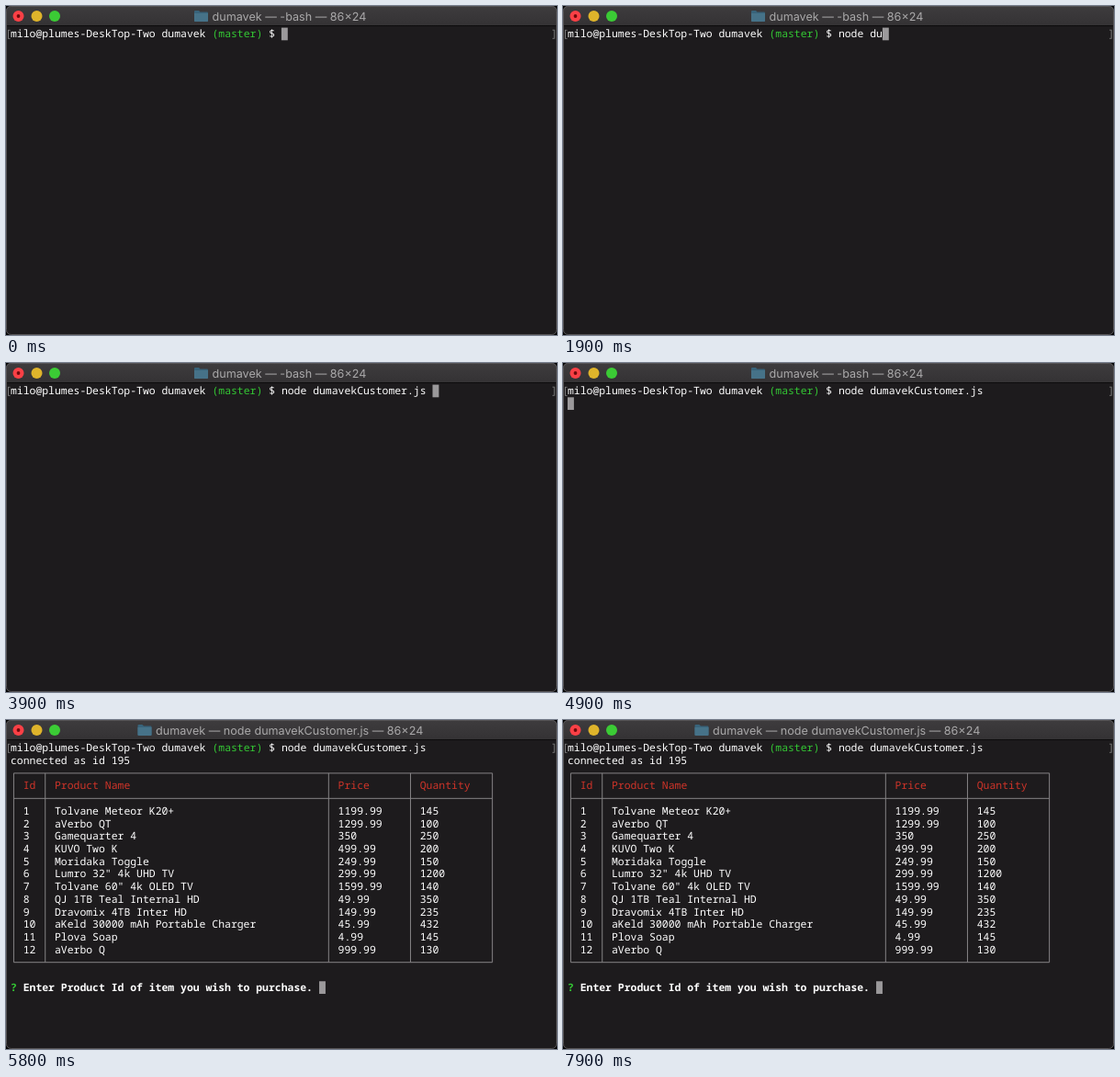
Recreate the animation shown at these times as an HTML page. Size 600 by 358 pixels, loop 8 s.

```html
<!DOCTYPE html>
<html lang="en">
<head>
<meta charset="utf-8">
<title>Terminal session</title>
<style>
  html, body { margin: 0; height: 100%; overflow: hidden; background: #000; }
  svg { display: block; width: 600px; height: 358px; }
  text { white-space: pre; text-rendering: geometricPrecision; }
  .mono { font: 500 11.43px "Noto Sans Mono", monospace; fill: #fff; }
  #title { font: 12.6px Inter, sans-serif; fill: #a9a8a9; }
  .mono .bold { font-weight: 700; }
  .mono .green { fill: #34c834; }
  .mono .red { fill: #cf3429; }
  .mono .dim { fill: #7c7b7c; font-weight: 400; }
</style>
</head>
<body>
<svg viewBox="0 0 600 358">
  <defs>
    <linearGradient id="bar" x2="0" y2="1">
      <stop stop-color="#3e3c3e"/><stop offset="1" stop-color="#343234"/>
    </linearGradient>
    <clipPath id="frame"><rect width="600" height="358" rx="5"/></clipPath>
  </defs>
  <g clip-path="url(#frame)">
    <rect width="600" height="358" fill="#1d1b1d"/>
    <rect width="600" height="21" fill="url(#bar)"/>
    <rect y="21" width="600" height="1" fill="#0c0b0c"/>
  </g>
  <rect x=".5" y=".5" width="599" height="357" rx="5" fill="none" stroke="#555355"/>
  <circle cx="13.5" cy="11" r="6" fill="#fb4046"/>
  <circle cx="13.5" cy="11" r="1.9" fill="#6e0a0c"/>
  <circle cx="33.5" cy="11" r="6" fill="#dfb42b"/>
  <circle cx="53" cy="11" r="6" fill="#3bcb35"/>
  <g id="heading">
    <path d="M0 6q0-1 1-1h4l1.5 1.5h7.5q1 0 1 1v8.500q0 1-1 1H1q-1 0-1-1z" fill="#38637a"/>
    <path d="M0 8h15v8q0 1-1 1H1q-1 0-1-1z" fill="#467288"/>
    <text id="title" x="19.500" y="15.700"></text>
  </g>
  <rect id="cursor" width="6.900" height="13.700" fill="#9b999b"/>
  <g class="mono">
    <g id="prompt"></g>
    <text id="typed"></text>
    <text id="status"></text>
    <g id="table"></g>
  </g>
</svg>
<script>
const $ = id => document.getElementById(id);
const LOOP = 8000, CELL = 6.858, LINE = 13.72;
const colX = c => 5 + c * CELL;
const rowY = r => 23.6 + r * LINE;
const app = "dumavek";
const command = `node ${app}Customer.js `;

// [time, number of characters typed]
const typing = [[0, 0], [1100, 1], [1200, 2], [1300, 3], [1500, 4], [1700, 5], [1800, 6],
  [1900, 7], [2200, 12], [3400, 13], [3700, 14], [3900, 24]];

const products = [
  ["Tolvane Meteor K20+", "1199.99", 145],
  ["aVerbo QT", "1299.99", 100],
  ["Gamequarter 4", "350", 250],
  ["KUVO Two K", "499.99", 200],
  ["Moridaka Toggle", "249.99", 150],
  ['Lumro 32" 4k UHD TV', "299.99", 1200],
  ['Tolvane 60" 4k OLED TV', "1599.99", 140],
  ["QJ 1TB Teal Internal HD", "49.99", 350],
  ["Dravomix 4TB Inter HD", "149.99", 235],
  ["aKeld 30000 mAh Portable Charger", "45.99", 432],
  ["Plova Soap", "4.99", 145],
  ["aVerbo Q", "999.99", 130]
];

const label = (col, row, str, cls = "") =>
  `<text x="${colX(col)}" y="${rowY(row) + 10.6}" class="${cls}">${str}</text>`;

function place(el, col, row, rise = 0) {
  el.setAttribute("x", colX(col));
  el.setAttribute("y", rowY(row) + rise);
}

function buildTable() {
  const edges = [0, 5, 50, 63, 76].map(c => colX(c + .5));
  const [top, mid, bottom] = [2, 4, 17].map(r => rowY(r) + LINE / 2);
  const lines = edges.map(x => `M${x} ${top}V${bottom}`).join("") +
    [top, mid, bottom].map(y => `M${edges[0]} ${y}H${edges[4]}`).join("");
  const cells = (values, row, cls) =>
    values.map((v, i) => label([2, 7, 52, 65][i], row, v, cls)).join("");
  return `<path d="${lines}" fill="none" stroke="#858385"/>` +
    cells(["Id", "Product Name", "Price", "Quantity"], 3, "red") +
    products.map((p, i) => cells([i + 1, ...p], i + 5)).join("") +
    label(0, 19, "?", "bold green") +
    label(2, 19, "Enter Product Id of item you wish to purchase.", "bold");
}

$("prompt").innerHTML = label(-.85, 0, "[", "dim") + label(85.8, 0, "]", "dim") +
  label(0, 0, `milo@plumes-DeskTop-Two ${app}`) +
  label(32, 0, "(master)", "green") + label(41, 0, "$");
$("table").innerHTML = buildTable();
$("status").textContent = "connected as id 195";
place($("typed"), 43, 0, 10.6);
place($("status"), 0, 1, 10.6);

function draw() {
  const t = performance.now() % LOOP;
  const count = typing.filter(([at]) => at <= t).pop()[1];
  const running = t >= 5000, connected = t >= 5700, listed = t >= 5800;

  $("typed").textContent = command.slice(0, count);
  $("title").textContent = `${app} — ${running ? command.trim() : "-bash"} — 86×24`;
  $("heading").setAttribute("transform", `translate(${running ? 143.5 : 205} 0)`);
  $("status").setAttribute("visibility", connected ? "visible" : "hidden");
  $("table").setAttribute("visibility", listed ? "visible" : "hidden");

  if (listed) place($("cursor"), 49, 19);
  else if (connected) place($("cursor"), 0, 2);
  else if (t >= 4900) place($("cursor"), 0, 1);
  else place($("cursor"), 43 + count, 0);
  requestAnimationFrame(draw);
}
draw();
</script>
</body>
</html>
```
